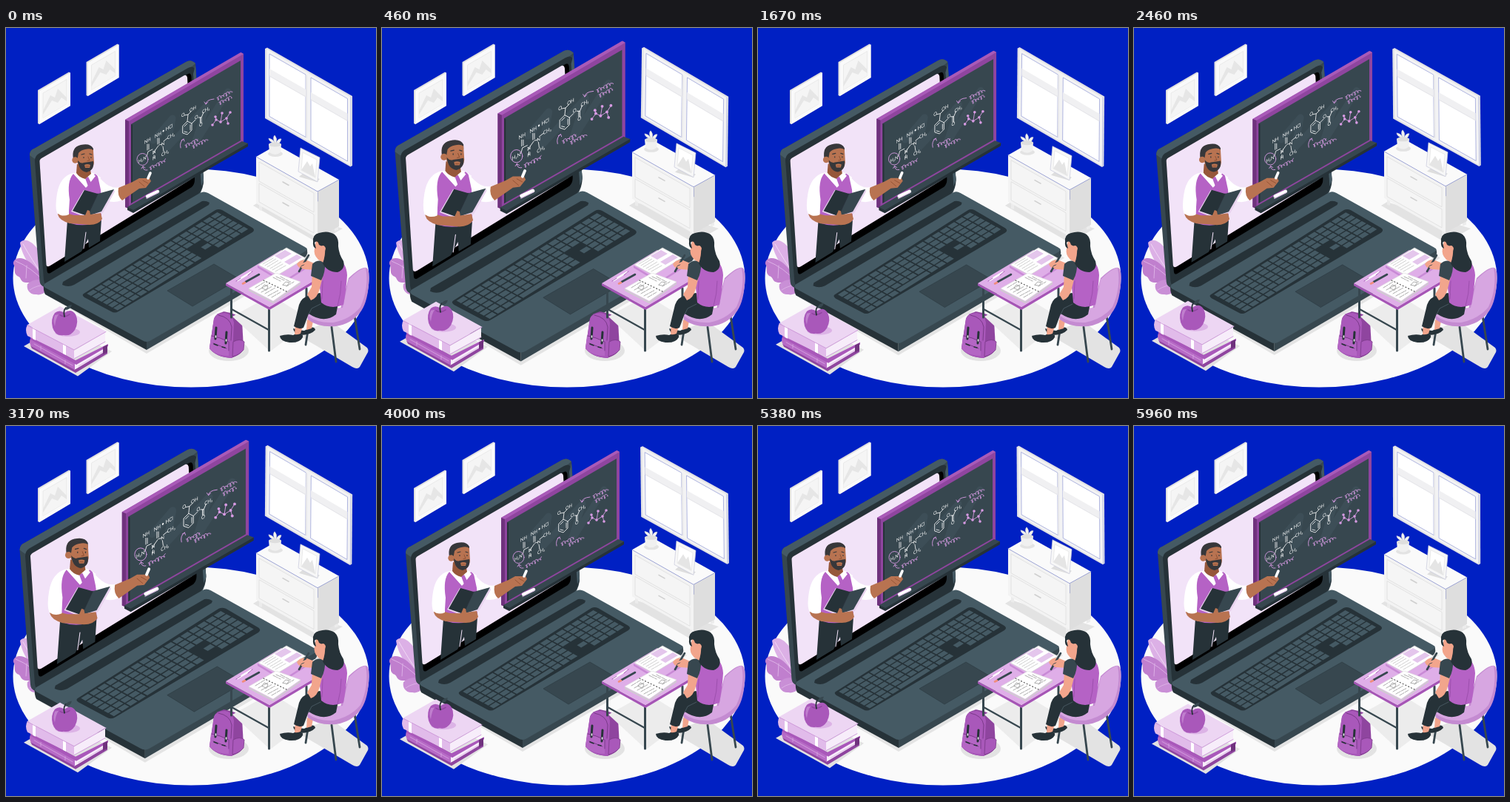
These frames come from a looping animation (500 by 500 pixels, 6 s). An HTML page:

```html
<!DOCTYPE html>
<html lang="en">
<head>
<meta charset="utf-8">
<title>Online lesson</title>
<style>
html,body{margin:0;width:100%;height:100%;overflow:hidden;background:#0020c3}
svg{display:block;width:100vw;height:100vh}
.line{fill:none;stroke-linecap:round;stroke-linejoin:round}
text{font-family:Lato,"Open Sans",sans-serif;font-size:7px;fill:#fff}
</style>
</head>
<body>
<svg viewBox="0 0 500 500">
<ellipse cx="250" cy="338" rx="240.500" ry="147.500" fill="#fafafa"/>

<!-- wall pictures -->
<g id="picture">
  <path fill="#e0e0e0" d="M43 84L85 59.500L87 60.500V105L45 130L43 129Z"/>
  <path fill="#fafafa" d="M45 85L87 60.500V105L45 130Z"/>
  <path fill="#f5f5f5" stroke="#e4e4e4" stroke-width=".7" d="M50 88L82 69.500V102.500L50 121.500Z"/>
  <path fill="#e6e6e6" d="M50 112L60 91L66 94L70 82L82 94V102.500L50 121.500Z"/>
  <path fill="#f5f5f5" d="M50 117L62 98L70 101L75 94L82 99V102.500L50 121.500Z"/>
</g>
<use href="#picture" x="65.500" y="-38"/>

<g id="window">
  <path fill="#e2e2e6" d="M350 28L353 26.500L468 92V186L465.500 187.500L350 122Z"/>
  <path fill="#f3f3f4" d="M352.500 28.500L466 93.500V186L352.500 121Z"/>
  <path fill="#fff" stroke="#7e88cf" stroke-width=".6" d="M356 35L405 63V147.500L356 119.500ZM412 67L461.500 95.500V180L412 151.500Z"/>
  <path fill="#f0f0f2" d="M356 55L405 83V92L356 64ZM412 87L461.500 115.500V124.500L412 96Z"/>
  <path fill="#e6e6ea" d="M405 63L407 64V149L405 147.500ZM356 64L405 92V93.500L356 65.500ZM412 96L461.500 124.500V126L412 97.500Z"/>
  <path class="line" stroke="#9ba3da" stroke-width=".6" d="M466 93.500V186"/>
</g>

<!-- dresser -->
<path fill="#e3e3e3" d="M334 240L342 235L455 271L421 290Z"/>
<g id="dresser">
  <path fill="#ececec" d="M342 239V246L346 247V240ZM416 281V288L421 289V281ZM444 268V275L449 273V267Z"/>
  <path fill="#f3f3f3" d="M338 174L421 221V284L338 237Z"/>
  <path fill="#dedede" d="M421 221L450 205V268L421 284Z"/>
  <path fill="#fafafa" d="M338 174L366 158L450 205L421 221Z"/>
  <path fill="#f5f5f5" stroke="#dedede" stroke-width=".8" d="M342 181L416 223V249L342 207ZM342 210L416 252V277L342 235Z"/>
  <path class="line" stroke="#cfcfcf" stroke-width="1.500" d="M374 208L382 212.500M374 236L382 240.500"/>
  <path class="line" stroke="#8b93c8" stroke-width=".6" d="M338 174L421 221L450 205M421.500 222V234"/>
  <ellipse cx="364" cy="170" rx="10" ry="4" fill="#e3e3e3"/>
  <path fill="#f3f3f3" stroke="#d6d6d6" stroke-width=".6" d="M362 156Q355 153 355 149Q361 150 363 155Q360 148 363 145Q367 149 365 155Q368 149 372 150Q371 155 366 158Z"/>
  <path fill="#f0f0f0" d="M355 157Q363 153 372 157L371 168Q364 174 356 168Z"/>
  <ellipse cx="363.500" cy="157.500" rx="8.500" ry="3" fill="#dedede"/>
  <path fill="#dedede" d="M396 201L420 208L424 204L402 196Z"/>
  <path fill="#f7f7f7" stroke="#c7c9dc" stroke-width=".7" d="M398 162L424 175L421 208L395 194Z"/>
  <path fill="#fff" stroke="#dedede" stroke-width=".6" d="M401 168L420 178L418 202L399 192Z"/>
  <path fill="#e5e5e5" d="M399 192L407 180L411 187L414 183L418 202Z"/>
</g>

<!-- leaves -->
<path fill="#dcb0e6" d="M54 345C38 332 21 309 19 290C25 283 35 288 43 299Z"/>
<path class="line" stroke="#f0d9f5" stroke-width="1" d="M23 292Q34 312 52 338"/>
<path fill="#c07fce" d="M58 348C46 349 36 343 27 344C18 343 22 337 15 335C9 330 14 325 10 319C9 313 16 309 24 312C40 318 46 333 58 348Z"/>
<path fill="#c98fd6" d="M60 346C56 356 49 362 41 360C33 361 27 354 29 346C38 338 48 338 60 346Z"/>
<path class="line" stroke="#dcb0e6" stroke-width="1" d="M13 315Q34 323 54 345M32 354Q42 347 56 347M28 321L27 338"/>

<g id="laptop">
  <path fill="#e4e4e4" d="M56 362L190 440L412 310L390 296Z"/>
  <!-- lid -->
  <path fill="#37474f" d="M32 172Q32 165 38 163L243 46Q250 42 256 48L267 206Q267 216 261 226L58 350L52 350Q46 348 45.500 342Z"/>
  <path fill="#455a64" d="M32 172Q32 165 38 163L243 46Q250 42 256 48L250 53L44 171L39 177Z"/>
  <path fill="#263238" d="M39 180Q39 173 44 170L246 54Q255 49 256 60L267 204Q267 216 259 226L56 349Q52 348 51 340Z"/>
  <path d="M45.500 181Q45 178 48 176L246 62Q250 60 250.500 66L255 205Q255 211 251 215L60 331Q56 333 55.500 328Z"/>
  <path fill="#f2e3f8" d="M45.500 181Q45 178 48 176L241 64Q244 63 245 67L252 197Q252 203 249 205L60 321Q55 324 54.500 320Z"/>
  <path fill="#455a64" d="M256 50L267 206L264 214L253 62Z"/>
  <!-- base -->
  <path fill="#263238" d="M51 346L190 423V435L53 360Q50 354 51 346Z"/>
  <path fill="#37474f" d="M190 423L406 297Q409 304 405 309L190 435Z"/>
  <path fill="#455a64" d="M53 345L262 223Q267 220 273 223L404 296Q409 299 404 302L196 422Q190 426 184 422L53 351Q49 348 53 345Z"/>
  <path fill="#263238" d="M77 343L265 234Q270 233 275 236L274 239L92 347Q84 351 76 347Z"/>
  <path fill="#263238" d="M105 359L283 246Q287 244 292 246L333 270Q337 273 333 276L152 383Q147 386 142 383L106 364Q102 361 105 359Z"/>
  <g id="keys" fill="#455a64"></g>
  <path fill="#37474f" stroke="#2f3e46" stroke-width=".8" d="M218 355L281 319L315 339L252 376Z"/>

  <!-- blackboard -->
  <path fill="#8f459f" d="M161 124L318 33L321 35V156L168 245L161 242Z"/>
  <path fill="#a95ab8" d="M161 124L317 33L321 35L166 126Z"/>
  <path fill="#6f327d" d="M161 124L166 126V244L161 242Z"/>
  <path fill="#37474f" d="M169 130L317 44V152L169 237Z"/>
  <path fill="#263238" d="M169 130L171 131V235L169 237Z"/>
  <path class="line" stroke="#3d4e57" stroke-width="9" d="M199 152L225 122L217 163L271 105L255 156L300 86"/>
  <path fill="#37474f" d="M164 242L319 153L327 156V158L172 248Z"/>
  <path fill="#263238" d="M172 246L327 156V160L172 250L164 246V242Z"/>
  <path class="line" stroke="#fff" stroke-width="4.500" d="M191 227.500L205 221"/>
  <path class="line" stroke="#d5b4df" stroke-width="1" d="M190 230.500L206 222.500"/>
  <g id="chalk"></g>
  <g class="line" stroke="#fff" stroke-width=".8">
    <path d="M191 157V165M193 157V164M190 174L192 167L198 164M199 170L201 166L206 159M205 149V157M207 149V156M207 158L211 157M213 153L218 149M212 160L213 167M200 172V176"/>
    <path d="M239 132L245 126L251 129L251 138L245 144L239 142ZM241 133L245 129M249 131V138M245 141L241 140M245 126L246 117L241 118M246 117L250 113M251 129L256 124M260 121L264 121L267 114M264 121V128M262.500 121V128"/>
  </g>
  <g class="line" stroke="#d69ae2" stroke-width=".9">
    <ellipse cx="184.500" cy="177.500" rx="7.500" ry="8"/>
    <path d="M185 187Q185 193 191 192M183 190L185 187L188 189"/>
    <path d="M240 150Q234 154 236 162M237 152L240 150L241 153"/>
    <path d="M270 103Q270 97 281 96M268 100L270 103L273 100"/>
    <path d="M279 131L284 124L290 127L292 115M290 127L298 122L303 114M298 122L300 129M284 124L283 120"/>
    <g id="notes"></g>
  </g>
  <g id="atoms" fill="#d69ae2"></g>

  <!-- teacher -->
  <path fill="#263238" d="M83 260L129 258L127 288L112 297L111 285L102 302L79 316Z"/>
  <path class="line" stroke="#f2e3f8" stroke-width="1" d="M108 276L105 298"/>
  <path fill="#fff" d="M91 196Q73 200 69 224Q66 242 69 250L86 256L90 232L124 222L128 202Q119 195 112 195Z"/>
  <path fill="#b562c5" d="M91 197Q82 207 86 232L84 263Q107 271 129 260L128 215Q127 200 120 197L108 216Z"/>
  <path fill="#fff" d="M94 194L111 191L121 200L109 215Z"/>
  <path fill="#b562c5" d="M107 203L111 201L116 211L111 214Z"/>
  <path fill="#96573a" d="M96 184L113 186L115 197L107 204Q99 202 95 196Z"/>
  <path fill="#37373a" d="M91 177Q88 161 101 158Q114 155 118 163L118 169L100 168L97 182Z"/>
  <path fill="#b87351" d="M98 169Q101 165 107 164Q114 162 118 165L119 182Q118 192 109 193Q98 192 96 180Z"/>
  <circle cx="93.500" cy="178.500" r="4.200" fill="#b87351"/>
  <path fill="#37373a" d="M97 179Q101 184 105 182L112 181L118 180Q120 192 109 195Q98 193 97 179Z"/>
  <path fill="#b87351" d="M106 185Q110 183 114 185L113 189H107Z"/>
  <path class="line" stroke="#37373a" stroke-width="1.200" d="M102 171L106 170M113 170L116 171M105 174.500V175.500M115 174.500V175.500"/>
  <path class="line" stroke="#8d4e31" stroke-width=".9" d="M111 174L113 179L110 179.500M108 187H112"/>
  <path fill="#fff" d="M124 200L131 207Q142 218 153 215L156 233Q141 239 130 228Z"/>
  <path fill="#b87351" d="M152 216L171 208L180 203L194 203L196 207L189 216L180 217L157 233Q150 227 152 216Z"/>
  <path class="line" stroke="#8d4e31" stroke-width=".8" d="M185 206L192 210M180 208L187 214"/>
  <path class="line" stroke="#fff" stroke-width="3.600" d="M192 203L195 196"/>
  <path fill="#e9d3ef" d="M88 248L105 219L108 220L93 247L111 254L130 246L146 218L147 221L131 250L111 257Z"/>
  <path fill="#263238" d="M90 247L106 219L124 224L110 254Z"/>
  <path fill="#37474f" d="M124 224L146 218L129 248L110 254Z"/>
  <path class="line" stroke="#263238" stroke-width="1" d="M124 224L110 254"/>
  <path fill="#b87351" d="M71 247Q85 251 92 253L107 253L110 246L113 247L114 252L128 250L130 258Q125 266 113 266L86 264Q72 260 70 252Z"/>
  <path fill="#fff" d="M69 228L85 232L85 252Q76 256 69 250Z"/>
</g>

<g id="books">
  <path fill="#e2e2e2" d="M24 430L73 402L143 437L97 470.500Z"/>
  <path fill="#8f459f" d="M33 429L94 461L137 435V440L94 466L35 433Z"/>
  <path fill="#f7edfa" d="M92 452L134 428V437L92 462Z"/>
  <path fill="#b76bc6" d="M34 418L93 451V462L34 430Q30 424 34 418Z"/>
  <path fill="#a958ba" d="M33 416L94 449L138 427V430L95 455L33 421Z"/>
  <path class="line" stroke="#d9a9e3" stroke-width=".8" d="M98 457L132 437M38 427L90 456M47 430V435M80 449V454"/>
  <path fill="#6f327d" d="M131 431L137 428V438L131 441Z"/>
  <path fill="#f7edfa" d="M92 436L134 411V424L92 447Z"/>
  <path fill="#e1bbea" d="M29 401L92 434V447L29 416Q25 408 29 401Z"/>
  <path fill="#edd6f3" d="M29 401L73 376L135 410L92 435Z"/>
  <path fill="#fff" d="M36 405L40 407V422L36 420ZM77 427L81 429V442L77 440Z"/>
  <path class="line" stroke="#cf9cdb" stroke-width="1" d="M29 402L92 435L135 410.500M92 447L134 424"/>
  <ellipse cx="83" cy="411" rx="17" ry="6" fill="#dcb3e6"/>
  <path fill="#a958ba" d="M79 385Q88 378 94 387Q99 397 93 408Q87 417 78 415Q67 417 63 405Q60 393 66 385Q72 380 79 385Z"/>
  <path fill="#c07fce" d="M66 388Q63 396 66 403Q67 393 71 387Z"/>
  <path class="line" stroke="#8f459f" stroke-width="1.500" d="M73 388Q79 392 86 387"/>
  <path class="line" stroke="#263238" stroke-width="1.800" d="M79 390Q77 382 81 378"/>
  <path fill="#37474f" d="M80 381Q82 374 89 374Q87 381 80 381Z"/>
</g>

<!-- backpack -->
<ellipse cx="301" cy="436" rx="27" ry="14" fill="#e3e3e3"/>
<path class="line" stroke="#8f459f" stroke-width="2.500" d="M291 388Q293 382 300 386"/>
<path fill="#8f459f" d="M281 393Q284 384 296 384Q311 384 319 396L321 432Q320 441 304 446Q284 445 275 433Z"/>
<path fill="#a958ba" d="M281 393Q284 385 296 385Q306 386 308 398L306 446Q284 445 275 433Z"/>
<path fill="#b466c4" d="M277 416Q290 419 301 423V443Q282 442 275 433Z"/>
<path fill="#a958ba" stroke="#7b3a8a" stroke-width=".8" d="M307 424Q316 419 322 424L321 435Q315 442 306 444Z"/>
<path class="line" stroke="#7b3a8a" stroke-width="1" d="M278 416Q289 418 301 424V436M287 388Q303 391 305 404L304 422M280 426L298 433"/>
<path class="line" stroke="#263238" stroke-width="3" d="M284 405L283 420M298 411L297 426"/>
<path class="line" stroke="#fff" stroke-width="1.500" d="M283.500 416V418M297.500 421V423"/>
<path class="line" stroke="#263238" stroke-width="1.500" d="M281 427L286 429M292 431L296 432"/>

<!-- table -->
<path fill="#ececec" d="M306 390L358 361L413 395L357 437Z"/>
<g class="line" stroke="#37474f" stroke-width="3">
  <path d="M304.500 352V391M355.500 380V436M406 352V388"/>
  <path d="M305 380L355 408" stroke-width="2.200"/>
</g>
<path fill="#a655b6" d="M297 345L356 377L425 336V340L356 381L297 348Z"/>
<path fill="#dfaee8" d="M297 345L372 300L427 335L356 377Z"/>
<path fill="#c98ad6" d="M340 321L375 342L406 322V325L375 345L340 324Z"/>
<path fill="#fff" stroke="#d2d2d2" stroke-width=".7" d="M341 320L379 297L405 311L367 334Z"/>
<path fill="#e4c6ec" d="M363 308L377 300L386 305L372 313ZM376 316L393 306L400 310L383 320Z"/>
<path class="line" stroke="#bbb" stroke-width=".7" stroke-dasharray="5 1" d="M347 319L361 311M350 321L365 312M353 323L368 314M357 325L372 316M360 327L374 319M364 329L378 321"/>
<path fill="#cfcfcf" d="M328 353L361 370L398 344V346L361 372L328 355Z"/>
<path fill="#fff" stroke="#ddd" stroke-width=".6" d="M328 352L365 331L398 343L361 369Z"/>
<path class="line" stroke="#555" stroke-width="1.200" stroke-dasharray="1 3.200" d="M348 341L379 356"/>
<path class="line" stroke="#888" stroke-width=".7" stroke-dasharray="4 1 2 1.500" d="M337 351L350 343M341 354L354 347M345 357L360 349M350 359L364 351M354 362L369 354M359 364L371 357M361 337L371 342M365 336L376 341M371 336L386 344M379 349L389 343"/>
<path class="line" stroke="#888" stroke-width=".7" d="M346 351L349 347L354 349L352 354ZM374 347L378 343L383 344L380 348Z"/>
<g class="line" stroke-width="2.600">
  <path stroke="#fff" d="M313 341L331 330"/><path stroke="#a655b6" stroke-width="1" d="M311 342L317 338M327 334L333 329"/>
  <path stroke="#37474f" d="M324 343L342 333"/><path stroke="#f08c7c" d="M320 345.500L323 344"/>
</g>

<!-- student -->
<path fill="#e3e3e3" d="M400 411L432 398Q438 396 444 400L488 432Q491 436 488 440L478 458Q475 462 468 458L400 418Q396 414 400 411Z"/>
<path class="line" stroke="#37474f" stroke-width="2.800" d="M410 396L405 428M440 404L446 451M471 389L478 434"/>
<path fill="#263238" d="M388 406Q396 409 403 409L411 405Q417 403 418 408Q412 415 398 415Q389 413 388 406ZM370 416Q380 413 388 415L396 411Q402 413 401 418Q397 426 383 425Q370 423 370 416Z"/>
<path fill="#f2a58c" d="M391 400L401 403L398 413Q393 415 390 414ZM407 394L415 396L413 406L406 408Z"/>
<path fill="#c48bd1" d="M463 338Q480 322 487 324Q492 327 490 347Q488 373 478 385Q466 400 446 403Q422 405 408 394Q405 386 414 381L452 379Z"/>
<path fill="#d7a6e1" d="M463 340Q478 325 486 324Q491 350 479 377Q465 394 442 398Q421 399 408 389Q410 383 419 380L455 378Z"/>
<path fill="#263238" d="M424 358L411 361Q399 364 396 374L389 403Q396 408 402 405L409 386Q430 400 446 387L449 372Z"/>
<path class="line" stroke="#4b5c65" stroke-width=".9" d="M409 387L413 379L425 373"/>
<path fill="#b562c5" d="M428 318Q438 310 448 312Q460 317 461 334Q460 352 456 374Q438 381 426 371Q424 345 421 333Z"/>
<path class="line" stroke="#9a4dab" stroke-width=".9" d="M453 342Q453 358 448 376M428 342L427 366"/>
<path fill="#f2a58c" d="M414 330L428 336L424 352Q421 365 412 368L407 360L413 350ZM417 327L403 326Q395 325 393 319Q398 312 407 314L419 319Z"/>
<path fill="#37474f" d="M414 319Q421 312 431 316Q432 330 426 341L412 335Z"/>
<path class="line" stroke="#37474f" stroke-width="2.600" d="M396 329L409 307"/>
<path class="line" stroke="#f2a58c" stroke-width="2.600" d="M398 320L406 317M400 323L408 320"/>
<path fill="#f2a58c" d="M419 287L433 290L434 309L429 317L422 313Q415 306 417 298Z"/>
<path fill="#263238" d="M415 289Q414 279 423 277Q435 273 444 279Q450 284 449 295Q450 306 456 315Q459 326 448 330Q434 330 428 318Q432 307 431 297L423 293Q421 286 417 290L419 298Q414 296 415 289Z"/>
<path fill="#f2a58c" d="M424 296Q430 291 432 298Q431 304 426 304Z"/>
</svg>
<script>
const get = id => document.getElementById(id);
const LOOP = 6000, FLOAT = 1500;

// Keyboard: u runs along the lid, v towards the trackpad.
const keyPoint = (u, v) => `${(108 + 178 * u + 43 * v).toFixed(1)} ${(359 - 111 * u + 23.5 * v).toFixed(1)}`;
const key = (a, b, c, d) => `M${keyPoint(a, c)}L${keyPoint(b, c)}L${keyPoint(b, d)}L${keyPoint(a, d)}Z`;
let keys = key(.24, .465, .85, .98);
for (let row = 0; row < 6; row++) {
  for (let col = 0; col < 17; col++) {
    if (col === 11 && row > 2 || col === 12 && (row === 3 || row === 5)) continue;
    if (row === 5 && col > 3 && col < 8) continue;
    keys += key((col + .06) / 17, (col + .9) / 17, (row + .08) / 6, (row + .88) / 6);
  }
}
get("keys").innerHTML = `<path d="${keys}"/>`;

const labels = [
  ["NH", 187, 157], ["NH", 201, 149], ["• HCl", 211, 142], ["CH₃", 218, 151],
  ["H₂N", 179, 183], ["N", 198, 171], ["N", 210, 160], ["H", 198, 179], ["CH₃", 210, 174],
  ["O", 237, 121], ["OH", 248, 114], ["O", 255, 124], ["CH₃", 265, 116], ["O", 261, 134]
];
get("chalk").innerHTML = labels.map(([s, x, y]) =>
  `<text transform="matrix(.82 -.46 0 .95 ${x} ${y})">${s}</text>`).join("");

// Looped handwriting rising along the board.
function scribble([x, y, width]) {
  const points = [];
  for (let d = 0; d <= width; d += .25) {
    const a = d * 1.7;
    points.push(`${(x + d + 1.4 * Math.sin(a)).toFixed(1)} ${(y - .5 * d - (1.7 + Math.sin(d * .6)) * Math.cos(a)).toFixed(1)}`);
  }
  return `<path d="M${points.join("L")}"/>`;
}
get("notes").innerHTML = [[194, 190, 22], [242, 160, 18], [252, 161, 20], [285, 96, 20], [288, 102, 17]].map(scribble).join("");

get("atoms").innerHTML = [[279,131],[284,124],[290,127],[292,115],[298,122],[303,114],[300,129],[283,120]]
  .map(([x, y]) => `<circle cx="${x}" cy="${y}" r="1.800"/>`).join("");

// Linear interpolation through [position, value] stops.
function track(stops, p) {
  const i = stops.findIndex(s => p < s[0]);
  const [a, x] = stops[i - 1], [b, y] = stops[i];
  return x + (y - x) * (p - a) / (b - a);
}
const beat = [[0, 1], [.1, 1.1], [.3, 1], [.4, 1], [.5, 1.1], [.6, 1], [1, 1]];
const lift = [[0, 0], [.5, -10], [1, 0]];
const sway = [[0, 0], [.25, 1], [.75, -1], [1, 0]];
const move = (id, value) => get(id).setAttribute("transform", value);

function draw() {
  const t = performance.now() % LOOP, p = t % FLOAT / FLOAT;
  const up = `translate(0 ${track(lift, p)})`;
  move("laptop", `translate(220 234) scale(${track(beat, t / LOOP)}) translate(-220 -234)`);
  move("books", up);
  move("dresser", up);
  move("window", `rotate(${track(sway, p)} 409 107)`);
  requestAnimationFrame(draw);
}
draw();
</script>
</body>
</html>
```
